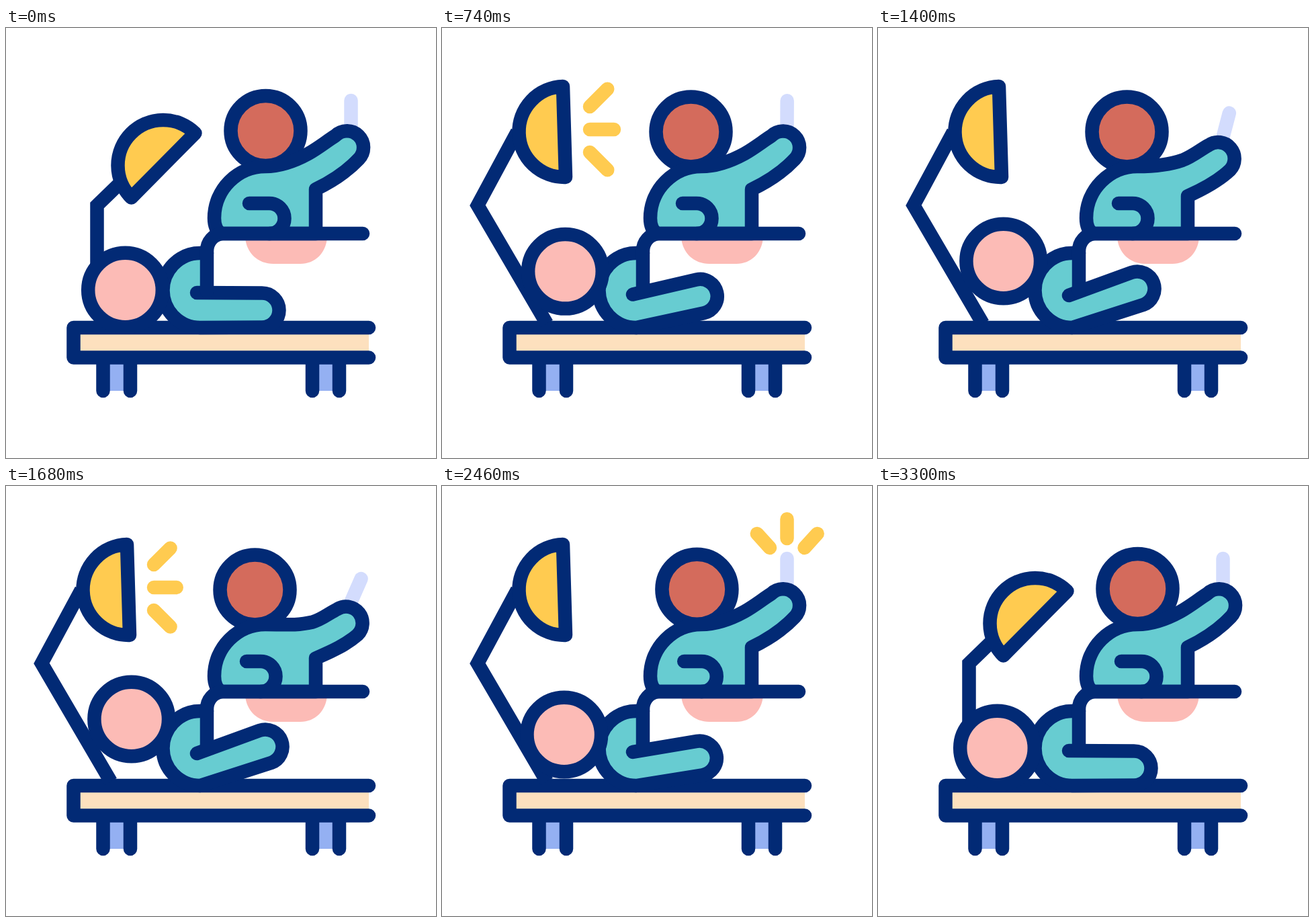
Animation of 640 by 640 pixels, one loop 3.6 s. Source, as an HTML page:

```html
<!DOCTYPE html>
<html lang="en">
<head>
<meta charset="utf-8">
<title>Treatment room</title>
<style>
  html, body { margin: 0; width: 100%; height: 100%; overflow: hidden; background: #fff; }
  svg { display: block; width: 100%; height: 100%; }
  .line { fill: none; stroke: #022a75; stroke-width: 20.5; stroke-linecap: round; stroke-linejoin: round; }
  .ray { stroke: #ffcb50; }
  .teal { fill: #67ccd1; }
  .yellow { fill: #ffcb50; }
</style>
</head>
<body>
<svg viewBox="0 0 640 640">
  <!-- table -->
  <path fill="#94b0f2" d="M144 490h41v50h-41zM456 490h40v50h-40z"/>
  <path fill="#fde0be" d="M100 446h440v44h-440z"/>
  <path class="line" d="M540 446H100.500V490.500H540M144.500 492V540M185 492V540M456 492V540M496 492V540"/>

  <!-- lamp -->
  <path id="stand" class="line" style="stroke-linecap:butt;stroke-linejoin:miter"/>
  <path id="lamp" class="line yellow" style="fill:#ffcb50" d="M0-67.500A67.500 67.500 0 0 0 0 67.500Z"/>
  <path id="lampRays" class="line ray"/>

  <!-- patient -->
  <path fill="#fcbbb6" d="M356 312C358 335 375 351 398 351H438C460 351 476 335 478 312Z"/>
  <path id="patientFill" class="teal"/>
  <path id="patientLine" class="line"/>
  <circle id="patientHead" class="line" style="fill:#fcbbb6" r="55.3"/>

  <!-- doctor -->
  <circle id="doctorHead" class="line" style="fill:#d46b5c" r="52"/>
  <path id="tool" class="line" style="stroke:#d3dcfd"/>
  <path id="doctorBody" class="line" style="fill:#67ccd1"/>
  <path id="innerArm" class="line"/>
  <path class="line" d="M531 306H322C309 307 299 318 299 332V392"/>
  <path id="toolRays" class="line ray"/>
</svg>
<script>
const LOOP = 3600, REST = 3300;
const $ = id => document.getElementById(id);
const set = (id, attrs) => {
  for (const k in attrs) $(id).setAttribute(k, attrs[k]);
};
const path = (id, d) => set(id, { d });
const mix = (a, b, p) => a + (b - a) * p;

// smooth step from 0 to 1, starting at `start` and lasting `len`
const ease = (t, start, len) => {
  const x = Math.min(1, Math.max(0, (t - start) / len));
  return x * x * (3 - 2 * x);
};

// repeated growing and shrinking between two times
const pulse = (t, start, end, period) => {
  if (t < start || t > end) return 0;
  const x = (t - start) % period;
  return ease(x, 0, period / 2) - ease(x, period / 2, period / 2);
};

function rays(id, list, p) {
  path(id, p < 0.01 ? '' : list.map(([x, y, dx, dy]) => `M${x} ${y}l${dx * p} ${dy * p}`).join(''));
}

function drawLamp(p) {
  const x = mix(234, 182, p) + 16 * p * (1 - p), y = mix(204.5, 154.5, p);
  set('lamp', { transform: `translate(${x} ${y}) rotate(${mix(44.7, -1.7, p)})` });
  path('stand', `M${mix(135.5, 156, p)} ${mix(415, 440, p)}` +
    `L${mix(135.5, 53, p)} 264L${x - 65 - 5 * p} ${y + 27 - 27 * p}`);
}

function drawPatient(p) {
  set('patientHead', { cx: mix(177.5, 186.7, p), cy: mix(390, 347, p) });
  const a = -19.5 * p * Math.PI / 180, r = 25.5;
  const cx = mix(381, 386, p), cy = mix(420, 388, p);
  const nx = r * Math.sin(a), ny = -r * Math.cos(a);
  const d = 'M299 335H289A55.500 55.500 0 0 0 289 446' +
    `L${cx - nx} ${cy - ny}A${r} ${r} 0 0 0 ${cx + nx} ${cy + ny}L284 ${394 + 4 * p}`;
  path('patientLine', d);
  path('patientFill', d + 'L299 394Z');
}

function drawDoctor(lean, arm) {
  set('doctorHead', { cx: 386.5 - 16 * lean, cy: 153 + 1.5 * lean });
  path('innerArm', `M${362 - 4 * lean} 261H${392 - 13 * lean}a22.500 22.500 0 0 1 0 45`);

  // each pair is a point with the arm raised and lowered
  const pt = (x0, y0, x1, y1) => `${mix(x0, x1, arm)} ${mix(y0, y1, arm)} `;
  path('doctorBody', 'M322 306C313 304 310 293 310 283C310 240 345 206 386 206' +
    'C' + pt(408, 206, 415, 206) + pt(430, 198, 437, 217) + pt(450, 187, 460, 217) +
    'C' + pt(466, 178, 475, 217) + pt(478, 168, 485, 207) + pt(490, 160.5, 497, 203) +
    'A24.500 24.500 0 0 1 ' + pt(525, 195, 522, 245) +
    'C' + pt(508, 213, 505, 257) + pt(488, 227, 485, 262) + pt(461, 240, 461, 271) +
    'V306Z');

  const a = arm * Math.PI / 4, x = 513.5 + 28.5 * arm, y = 108 + 57 * arm;
  path('tool', `M${x} ${y}l${-45 * Math.sin(a)} ${45 * Math.cos(a)}`);
}

function draw(now) {
  let t = now % LOOP;
  if (t >= REST) t = 0;
  drawLamp(ease(t, 0, 480) - ease(t, 2480, 480));
  drawPatient(ease(t, 0, 1240) - ease(t, 1870, 1130));
  const lean = ease(t, 0, 420) - ease(t, 2235, 420) + ease(t, 2920, 420);
  const arm = ease(t, 720, 480) - ease(t, 1200, 320) + ease(t, 1520, 320) - ease(t, 1840, 320);
  drawDoctor(lean, 1.045 * arm);
  rays('lampRays', [[220, 117, 35, -35], [220, 151, 48, 0], [220, 185, 35, 35]],
    pulse(t, 606, 2210, 401));
  rays('toolRays', [[513.5, 78, 0, -30], [488, 92, -20, -22], [539.5, 92, 20, -22]],
    pulse(t, 2236, REST, 400));
}

const start = performance.now();
function tick() {
  draw(performance.now() - start);
  requestAnimationFrame(tick);
}
tick();
</script>
</body>
</html>
```
